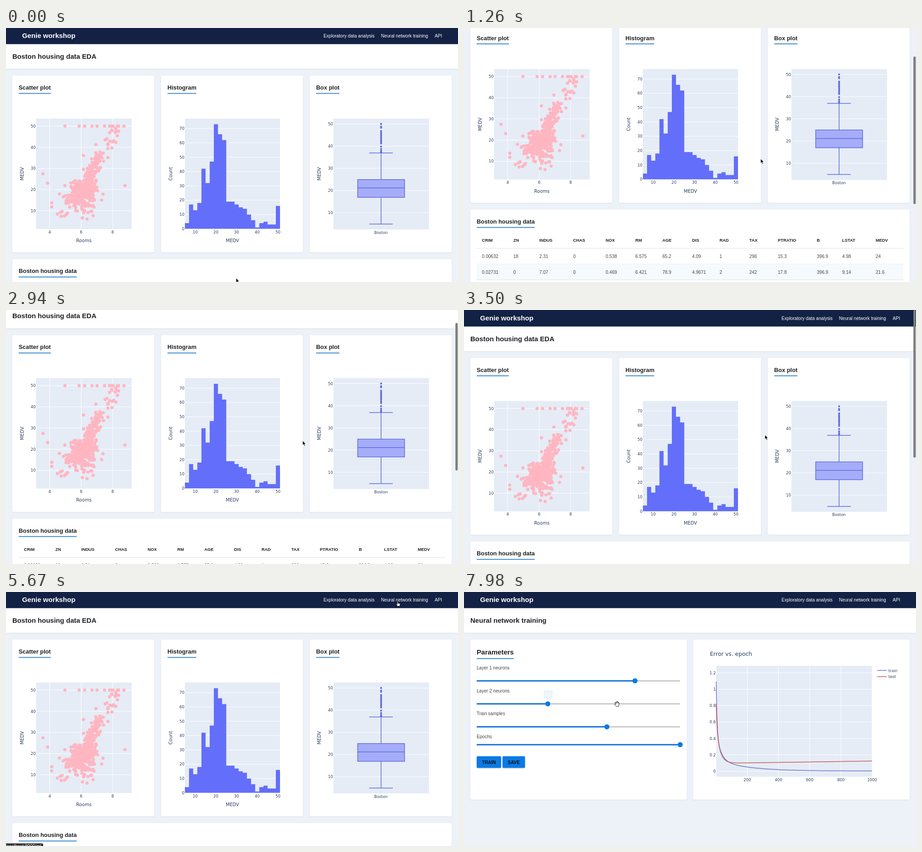
Write an HTML page that moves like this. It is 998x561 px and loops after 8 s.

```html
<!DOCTYPE html>
<html lang="en">
<head>
<meta charset="utf-8">
<title>Genie workshop</title>
<style>
html, body { margin: 0; width: 998px; height: 561px; overflow: hidden; background: #edf2f8; }
svg { display: block; }
text { font-family: "Liberation Sans", Arial, sans-serif; font-size: 10.06px; fill: #444; white-space: pre; }
.brand { font-size: 15.15px; font-weight: 700; fill: #fff; }
.link { font-size: 10.1px; fill: #fff; }
.h1 { font-size: 15.05px; font-weight: 700; fill: #1f2022; }
.h2 { font-size: 12.9px; font-weight: 700; fill: #1f2022; }
.th { font-size: 9.34px; font-weight: 700; fill: #1f2022; }
.btn { font-weight: 700; fill: #06101c; text-anchor: middle; }
.tick, .axis, .title { font-family: "DejaVu Sans", Verdana, sans-serif; fill: #2a3f5f; }
.tick { font-size: 8.62px; }
.axis { font-size: 10.06px; text-anchor: middle; }
.title { font-size: 12.35px; }
.mid { text-anchor: middle; }
.end { text-anchor: end; }
.card { fill: #fff; filter: drop-shadow(0 1px 1.5px rgba(30, 50, 80, .09)); }
.grid { stroke: #fff; stroke-width: 1; }
.box { fill: none; stroke: #5f6bdc; stroke-width: 1.5; }
.curve { fill: none; stroke-width: 1.5; }
.bar { stroke-width: 2.9; }
.cur { stroke-linejoin: round; stroke-linecap: round; }
</style>
</head>
<body>
<svg id="stage" width="998" height="561" viewBox="0 0 998 561"></svg>
<script>
const LOOP = 8000, STEP = 70;
const BLUE = '#2b81cb', PLOT = '#e5ecf6', INDIGO = '#636efa', TRAIN = '#6872d0', TEST = '#c75b55';

const text = (x, y, s, cls = '', more = '') => `<text x="${x}" y="${y}" class="${cls}" ${more}>${s}</text>`;
const rect = (x, y, w, h, fill, more = '') => `<rect x="${x}" y="${y}" width="${w}" height="${h}" fill="${fill}" ${more}/>`;
const card = (x, y, w, h) => `<rect class="card" x="${x}" y="${y}" width="${w}" height="${h}" rx="3"/>`;
const line = (x1, y1, x2, y2, more) => `<path d="M${x1} ${y1}L${x2} ${y2}" ${more}/>`;
const dot = (x, y, r, fill) => `<circle cx="${x}" cy="${y}" r="${r}" fill="${fill}"/>`;
const range = (a, b, d) => Array.from({ length: Math.round((b - a) / d) + 1 }, (_, i) => +(a + i * d).toFixed(2));
const side = (x, s) => text(x, 322, s, 'axis', `transform="rotate(-90 ${x} 322)"`);
const heading = (x, y, s, w) => text(x, y, s, 'h2') + rect(x, y + 7.6, w, 1.8, BLUE);

const yTicks = (vals, pos, x1, x2) => vals.map(v =>
  line(x1, pos(v), x2, pos(v), 'class="grid"') + text(x1 - 1, pos(v) + 3.1, v, 'tick end')).join('');
const xTicks = (vals, pos, y1, y2, grid) => vals.map(v =>
  (grid ? line(pos(v), y1, pos(v), y2, 'class="grid"') : '') + text(pos(v), y2 + 9.5, v, 'tick mid')).join('');

function header(title) {
  return '<rect class="card" y="36" width="998" height="54"/>' + rect(0, -20, 998, 55.6, '#122144') +
    text(35.5, 22, 'Genie workshop', 'brand') +
    text(701, 21, 'Exploratory data analysis', 'link') +
    text(828, 21, 'Neural network training', 'link') +
    text(946.5, 21, 'API', 'link') + text(14, 68, title, 'h1');
}

function scatter() {
  let seed = 11;
  const rnd = () => (seed = (seed * 16807) % 2147483647) / 2147483647;
  const gauss = () => (rnd() + rnd() + rnd() + rnd() - 2) * 1.73;
  const pts = [[81.5, 322], [92, 342.5], [262.5, 348], [171, 281.5], [198.5, 257.5], [171, 312],
    [225, 286], [214, 367], [211, 380], [101, 386], [101, 395], [130, 348], [118, 366.5]];
  for (const x of [130, 161.5, 173.5, 190, 201, 217.5, 228.5, 232, 236.5, 246, 248.5, 260.5]) pts.push([x, 216.7]);
  const add = (n, make, ok = () => true) => {
    while (n) { const p = make(); if (ok(...p)) { pts.push(p); n--; } }
  };
  // Main cloud, rising arm, low fringe, left fringe, upper right
  add(300, () => { const x = 171 + 14 * gauss(); return [x, 359 - (x - 171) * .2 + 17 * gauss()]; },
    (x, y) => x > 142 && x < 203 && y > 333 && y < 393);
  add(95, () => { const k = rnd(); return [182 + 26 * k + 6 * gauss(), 332 - 52 * k + 6 * gauss()]; },
    (x, y) => x < 216 && y > 272);
  add(24, () => [140 + 56 * rnd(), 392 + 34 * rnd() ** 1.5]);
  add(16, () => [126 + 16 * rnd(), 368 + 20 * rnd()]);
  add(7, () => [109 + 28 * rnd(), 401 + 16 * rnd()]);
  add(20, () => { const k = rnd(); return [220 + 24 * k + 4 * gauss(), 248 - 18 * k + 11 * gauss()]; },
    (x, y) => x < 251 && y > 221);
  const px = v => 96.5 + (v - 4) * 34.75, py = v => 450.5 - 4.676 * v;
  return rect(66.5, 200, 211, 244, PLOT) + xTicks([4, 6, 8], px, 200, 444, true) +
    yTicks(range(10, 50, 10), py, 66.5, 277.5) +
    pts.map(([x, y]) => dot(x.toFixed(1), y.toFixed(1), 3.6, '#ffb6c1')).join('') +
    text(172, 473, 'Rooms', 'axis') + side(38.5, 'MEDV');
}

function histogram() {
  const counts = [4, 17, 13, 18, 42, 32, 47, 73, 66, 62, 19, 19, 17, 15, 14, 10, 6, 1, 4, 5, 3, 3, 16];
  const py = v => 443.6 - 3.164 * v;
  const bars = counts.map(n => `V${py(n).toFixed(1)}h9.13`).join('');
  return rect(395, 200, 210, 244, PLOT) + yTicks(range(0, 70, 10), py, 395, 605) +
    xTicks(range(10, 50, 10), v => 417.7 + (v - 10) * 4.57, 200, 444) +
    `<path d="M395 443.6${bars}V443.6Z" fill="${INDIGO}"/>` +
    text(500, 473, 'MEDV', 'axis') + side(367, 'Count');
}

function boxPlot() {
  const py = v => 457 - 4.9 * v;
  const outliers = [50, 48.8, 48.3, 39.8, 38.7, 37.9, 37.3, ...range(41.2, 46.8, .7)];
  return rect(723, 200, 211, 245, PLOT) + yTicks(range(10, 50, 10), py, 723, 934) +
    rect(776.5, 334.7, 103.5, 39.3, '#a5adfa') +
    '<path class="box" d="M776.5 334.7h103.5v39.3h-103.5zM776.5 353.3h103.5M828.2 334.7V276M802 276h52M828.2 374V433M802 433h52"/>' +
    outliers.map(v => dot(828.2, py(v), 2.15, '#5f6bdc')).join('') +
    text(828, 454.5, 'Boston', 'tick mid') + side(694.5, 'MEDV');
}

function table() {
  const xs = [39.5, 109, 166.3, 241, 312.7, 378.3, 438, 503.6, 564.3, 630, 693, 779, 835, 909];
  const rows = ['CRIM ZN INDUS CHAS NOX RM AGE DIS RAD TAX PTRATIO B LSTAT MEDV',
    '0.00632 18 2.31 0 0.538 6.575 65.2 4.09 1 296 15.3 396.9 4.98 24',
    '0.02731 0 7.07 0 0.469 6.421 78.9 4.9671 2 242 17.8 396.9 9.14 21.6',
    '0.02729 0 7.07 0 0.469 7.185 61.1 4.9671 2 242 17.8 392.83 4.03 34.7'];
  return rows.map((row, r) => {
    const y = 596 + 34.7 * r;
    return (r === 2 ? rect(28, y - 34.7, 942, 34.7, '#f4fafd') : '') +
      line(28, y, 970, y, 'stroke="#dde1e6"') +
      row.split(' ').map((s, i) => text(xs[i], r ? y - 13.5 : 581.8, s, r ? '' : 'th')).join('');
  }).join('');
}

function edaPage() {
  return header('Boston housing data EDA') +
    [14, 342.3, 670.6].map(x => card(x, 105, 313.4, 390.5)).join('') + card(14, 510.5, 970, 440) +
    heading(28, 136, 'Scatter plot', 71) + heading(356.6, 136, 'Histogram', 63.4) +
    heading(684.8, 136, 'Box plot', 51.4) + heading(28, 541.4, 'Boston housing data', 128) +
    scatter() + histogram() + boxPlot() + table();
}

function slider(label, labelY, y, x) {
  return text(28, labelY, label) + line(28, y, 477, y, 'class="bar" stroke="#c9c9c9"') +
    line(28, y, x, y, 'class="bar" stroke="#1277da"') + dot(x, y, 5.6, '#0d79e2');
}

function button(x, w, s) {
  return rect(x, 362.7, w, 25.8, '#0b7ae4', 'rx="2" style="filter:drop-shadow(0 1px 1px #0003)"') +
    text(x + w / 2, 379.5, s, 'btn');
}

function lossChart() {
  const px = v => 556.6 + v * .3445, py = v => 396 - 181.3 * v;
  const decay = (a, e, tau) => a * Math.exp(-e / tau);
  const train = e => decay(.75, e, 5) + decay(.35, e, 28) + decay(.14, e, 190) + .003;
  const test = e => decay(.32, e, 5) + decay(.48, e, 23) + .097 + .000028 * e;
  const epochs = [...range(1, 99, 2), ...range(100, 1000, 20)];
  const curve = (f, color) => `<path class="curve" stroke="${color}" d="M${
    epochs.map(e => px(e).toFixed(1) + ' ' + py(f(e)).toFixed(1)).join('L')}"/>`;
  const legend = (y, s, color) => line(912, y, 933.5, y, `class="curve" stroke="${color}"`) + text(937, y + 3.2, s, 'tick');
  return rect(557, 163, 344, 245, PLOT) + xTicks(range(200, 1000, 200), px, 163, 408, true) +
    yTicks(range(0, 1.2, .2), py, 557, 901) + curve(train, TRAIN) + curve(test, TEST) +
    text(543, 141, 'Error vs. epoch', 'title') + legend(173.3, 'train', TRAIN) + legend(187, 'test', TEST);
}

function trainPage() {
  return header('Neural network training') + card(14, 105, 478, 353.5) + card(506, 105, 478, 353.5) +
    text(28, 138, 'Parameters', 'h1') + rect(28, 146.2, 82, 1.8, BLUE) +
    slider('Layer 1 neurons', 170.7, 196.2, 377.5) + slider('Layer 2 neurons', 221.6, 247, 185) +
    slider('Train samples', 272.4, 297.8, 315.5) + slider('Epochs', 323.2, 337.2, 477.3) +
    button(28, 54, 'TRAIN') + button(85, 49.7, 'SAVE') + lossChart() +
    `<g id="tip">${rect(176, 217, 20, 18, '#ebf4fc', 'rx="1.5"')}<path d="M182 235h6l-3 3z" fill="#ebf4fc"/>` +
    text(186, 229.5, '27', 'mid', 'style="fill:#fff"') + '</g>';
}

const shapes = {
  arrow: '<path d="M0 0V9.4L2.1 7.5 3.8 11.3 5.5 10.5 3.9 6.9H6.7Z" stroke="#fff" stroke-width=".7"/>',
  hand: '<path d="M2.3 6.3V1.3a.9.9 0 0 1 1.8 0V4.4l3.6.7.8.9V8L7.6 9.5V11H3.3L.5 7.3C.2 6.3 1.3 5.7 2.3 6.7Z" fill="#fff" stroke="#111" stroke-width=".8"/>',
  grab: '<path d="M2.5 7 1.5 3.2q.4-1.3 1.5-.4l.8 2V1.5q.9-1.2 1.7 0V.9q.9-1 1.7 0v1q1.1-.8 1.7.4v1.2q1.4-.6 1.5.6L9.9 9 9.3 11.8H4.3L.6 7.7q-.4-1.5 1.1-1.3Z" fill="#fff" stroke="#111" stroke-width=".9"/><path d="M5.5 1.5V5M7.2 1.7V5M8.9 2.8V5.3" stroke="#111" stroke-width=".6"/>'
};

const stage = document.getElementById('stage');
stage.innerHTML = rect(0, 0, 998, 561, '#edf2f8') +
  `<g id="eda">${edaPage()}</g><g id="train">${trainPage()}</g>` +
  rect(992.3, 0, 5, 326, '#7d7d7d', 'id="thumb" rx="2.5"') +
  `<g id="status">${rect(-6, 555.3, 88, 14, '#2c2d30', 'rx="3"')}${text(-1, 565, 'localhost:8000/ml', 'link')}</g>` +
  Object.entries(shapes).map(([k, s]) => `<g id="${k}" class="cur">${s}</g>`).join('');
const set = (id, name, value) => document.getElementById(id).setAttribute(name, value);
const show = (id, on) => set(id, 'visibility', on ? 'visible' : 'hidden');

const ramp = (t, a, b) => Math.min(1, Math.max(0, (t - a) / (b - a)));
const ease = (t, a, b) => { const p = ramp(t, a, b); return p * p * (3 - 2 * p); };

// The page scrolls down, comes back and bounces slightly past the top
const scrollAt = t => 141.5 * (ease(t, 700, 1510) - ease(t, 2450, 3265)) - Math.sin(Math.PI * ramp(t, 3200, 3640));
const thumbAlpha = t => ramp(t, 700, 770) - ramp(t, 2100, 2310) + ramp(t, 2450, 2520) - ramp(t, 3920, 4130);

// Pointer moves: from time, to time, x, y
const moves = [[0, 70, 508, 550], [140, 350, 655, 289], [3360, 4400, 846, 27], [4550, 4620, 896, 11],
  [5040, 5390, 872, 22], [5460, 5670, 861.5, 20.5], [6090, 6790, 637, 128], [6790, 7000, 388, 220],
  [7070, 7980, 332, 241]];

function pointerAt(t) {
  let x = 508, y = 552.5;
  for (const [a, b, toX, toY] of moves) {
    const p = ease(t, a, b);
    x += (toX - x) * p;
    y += (toY - y) * p;
  }
  return `${x} ${y}`;
}

function draw(now) {
  const t = Math.floor(now % LOOP / STEP) * STEP;
  const y = scrollAt(t);
  const onLink = t >= 4480 && t < 6230;
  const kind = t >= 7840 ? 'grab' : onLink ? 'hand' : 'arrow';
  show('eda', t < 6020);
  show('train', t >= 6020);
  show('status', onLink && t >= 5530);
  for (const k in shapes) show(k, k === kind);
  set('eda', 'transform', `translate(0 ${-y})`);
  set('thumb', 'y', Math.max(0, y) * .575);
  set('thumb', 'opacity', thumbAlpha(t));
  set('tip', 'opacity', ramp(t, 7770, 7910));
  set(kind, 'transform', `translate(${pointerAt(t)})`);
}

let start;
function tick(now) {
  start ??= now;
  draw(now - start);
  requestAnimationFrame(tick);
}
draw(0);
requestAnimationFrame(tick);
</script>
</body>
</html>
```
